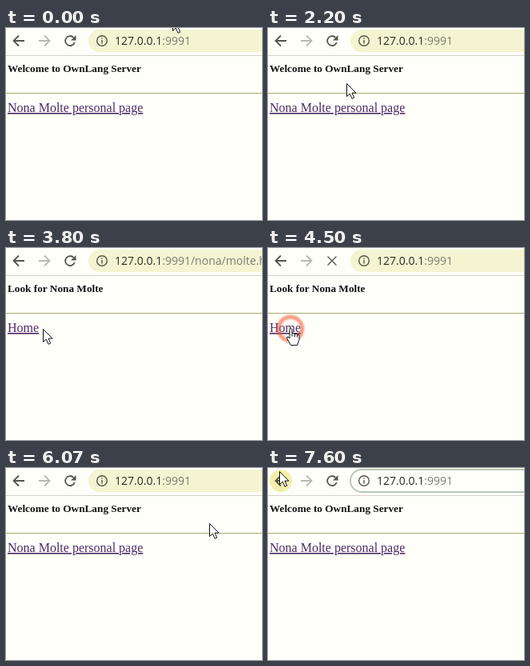
Write an HTML page that moves like this. It is 320x240 px and loops after 8 s.

```html
<!DOCTYPE html>
<html lang="en">
<head>
<meta charset="utf-8">
<title>Local server demo</title>
<style>
  html, body { margin: 0; height: 100%; overflow: hidden; background: #fffffa; }
  svg { display: block; width: 320px; height: 240px; }
  .icon { fill: none; stroke: #55554a; stroke-width: 1.8; }
  .thin { stroke-width: 1.4; }
  .serif { font-family: "Liberation Serif", "Times New Roman", serif; }
  #title { font-size: 13.28px; font-weight: bold; fill: #111; }
  #link { font-size: 16px; fill: #4d2a68; text-decoration: underline; }
  #url { font: 14px "Open Sans", "Noto Sans", sans-serif; fill: #2a2a25; }
  #rest { fill: #7c7c70; }
  #ring { fill: none; stroke: #f0502c; stroke-width: 5; filter: blur(.8px); }
  #cursor path { fill: #fff; stroke: #111; stroke-linejoin: round; }
  #cursor #beam { fill: none; }
</style>
</head>
<body>
<svg viewBox="0 0 320 240">
  <rect width="320" height="240" fill="#fffffa"/>
  <circle id="hover" cy="16" r="14" fill="#f1efa9"/>
  <path class="icon" d="M23 16H10.5M16 9.5L9.5 16l6.5 6.5"/>
  <path class="icon" style="stroke:#b9b9ae" d="M41 16H53.5M48 9.5l6.5 6.5-6.5 6.5"/>
  <g id="reload">
    <path class="icon" d="M85.8 18A6 6 0 1 1 84.4 11.8"/>
    <path fill="#55554a" d="M87.5 9v6.5H81z"/>
  </g>
  <path id="stop" class="icon thin" d="M74.5 10.5l11 11m0-11l-11 11"/>
  <rect id="box" x="103" y="2" width="260" height="28" rx="14" stroke-width="2"/>
  <circle class="icon thin" cx="120" cy="16" r="6.3"/>
  <path class="icon thin" d="M120 12.2v1.6M120 15v4.6"/>
  <text id="url" x="136" y="21">127.0.0.1<tspan id="rest"></tspan></text>
  <path id="caret" d="M231.5 8v16" stroke="#222"/>
  <path d="M0 34.5H320" stroke="#d3d3c8"/>
  <text id="title" class="serif" x="2" y="55"></text>
  <path d="M0 81.5H320" stroke="#b2b284"/>
  <path d="M0 82.5H320" stroke="#eeeee0"/>
  <text id="link" class="serif" x="2" y="105"></text>
  <circle id="ring"/>
  <g id="cursor">
    <path id="arrow" d="M0 0V16L3.8 12.6 6.6 18.8 9.2 17.6 6.5 11.6H11.5Z"/>
    <path id="hand" d="M-1.5 0Q0-2 1.5 0V5Q3.5 4 5 6 7 5 8 7 10.500 6 10.500 9V13L8 20H0L-4.500 12Q-5.500 9-3.500 9.500L-1.500 11.500ZM1.500 5V9M5 6V9.500M8 7V10"/>
    <path id="beam" d="M-3-8H-1L0-7 1-8H3M0-7V7M-3 8H-1L0 7 1 8H3"/>
  </g>
</svg>
<script>
const $ = id => document.getElementById(id);
const show = (id, on) => $(id).style.display = on ? "" : "none";
const setText = (id, text) => { if ($(id).textContent !== text) $(id).textContent = text; };
const set = (id, attrs) => { for (const k in attrs) $(id).setAttribute(k, attrs[k]); };
const within = (t, a, b) => t >= a && t < b;
const clamp = p => Math.min(1, Math.max(0, p));
const ease = p => p * p * (3 - 2 * p);

const LOOP = 8000;
const RING = 400;
const place = {
  above: [208, -13], page: [160, 84], reload: [85, 20], link: [107, 102], home: [28, 101],
  port: [208, 18], idle: [268, 84], field: [278, 17], below: [60, 118], back: [14, 4]
};
// each move: start, end, destination
const moves = [
  [200, 600, "page"], [600, 1220, "reload"], [1850, 2470, "link"], [3650, 3870, "home"],
  [4760, 5400, "port"], [5850, 6170, "idle"], [6500, 6900, "field"],
  [7110, 7310, "below"], [7310, 7590, "back"]
];
const clicks = { reload: 1400, link: 2900, home: 4240, field: 6958 };

function pointer(t) {
  let pos = place.above;
  for (const [from, to, name] of moves) {
    const e = ease(clamp((t - from) / (to - from)));
    pos = pos.map((v, i) => v + (place[name][i] - v) * e);
  }
  return pos.map(Math.round);
}

function draw(t) {
  const [x, y] = pointer(t);
  const since = name => t - clicks[name];
  const personal = since("link") >= 500 && since("home") < 460;
  const loading = within(since("reload"), 150, 300) || within(since("link"), 350, 550)
    || within(since("home"), 160, 510);
  const focused = since("field") >= 30;

  setText("title", personal ? "Look for Nona Molte" : "Welcome to OwnLang Server");
  setText("link", personal ? "Home" : "Nona Molte personal page");
  const deep = since("link") >= 200 && since("home") < 160;
  setText("rest", ":9991" + (deep ? "/nona/molte.html" : ""));
  show("reload", !loading);
  show("stop", loading);

  const inBox = x > 102 && within(y, 2, 31);
  const onLink = x >= 2 && x < (personal ? 42 : 171) && within(y, 91, 109);
  show("beam", inBox);
  show("hand", onLink);
  show("arrow", !inBox && !onLink);
  set("cursor", { transform: `translate(${x + .5} ${y + .5})` });

  set("box", {
    fill: focused ? "#fffffa" : inBox ? "#e9ebc6" : "#f4f4d2",
    stroke: focused ? "#b8c8b6" : "none"
  });
  show("caret", within(since("field"), 30, 530));

  const button = [16, 80].find(c => Math.hypot(x - c, y - 16) < 14);
  show("hover", button);
  if (button) set("hover", { cx: button });

  const click = Object.keys(clicks).find(name => within(since(name), 0, RING));
  show("ring", click);
  if (click) {
    const p = since(click) / RING, [cx, cy] = place[click];
    set("ring", { cx, cy, r: 5 + 15 * p, opacity: 1 - p * p });
  }
}

const start = performance.now();
function tick() {
  draw((performance.now() - start) % LOOP);
  requestAnimationFrame(tick);
}
tick();
</script>
</body>
</html>
```
